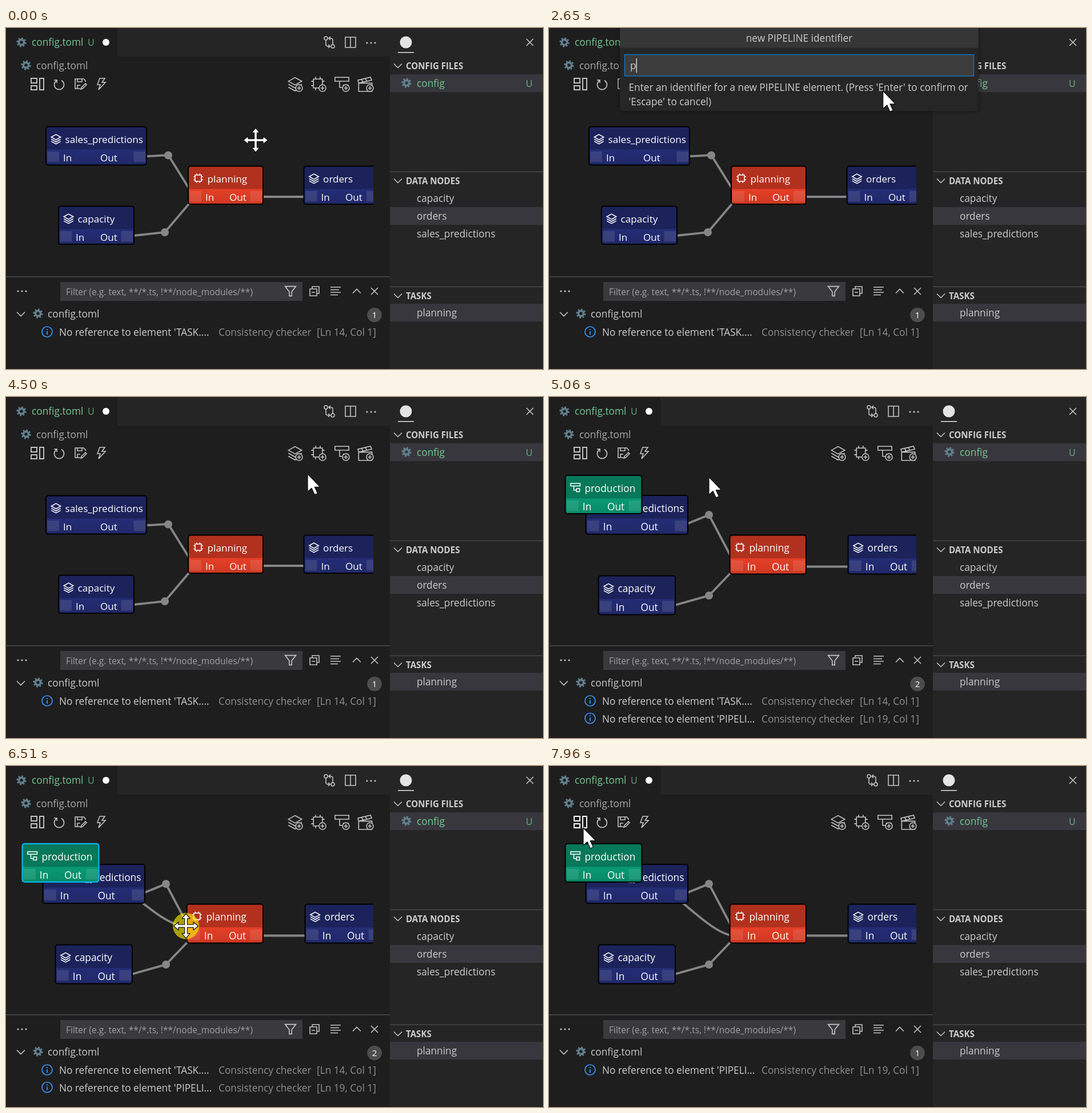
Recreate the animation shown at these times as an HTML page. Size 940x596 px, loop 8 s.

```html
<!DOCTYPE html>
<html lang="en">
<head>
<meta charset="utf-8">
<title>Config editor</title>
<style>
html, body { margin: 0; width: 100%; height: 100%; overflow: hidden; background: #1e1e1e; }
svg { display: block; width: 100%; height: 100%; }
text { font: 17.25px "Open Sans", "Noto Sans", sans-serif; white-space: pre; }
</style>
</head>
<body>
<svg id="stage" viewBox="0 0 940 596"></svg>
<script>
const LOOP = 8000, STEP = 70;
const GRAY = '#c5c5c5', GREEN = '#73c991', LINK = '#868686';

// Drawing helpers
const box = (x, y, w, h, fill, more = '') =>
  `<rect x="${x}" y="${y}" width="${w}" height="${h}" fill="${fill}" ${more}/>`;
const text = (s, x, cy, fill = '#ccc', more = '') =>
  `<text x="${x}" y="${cy + 6}" fill="${fill}" ${more}>${s}</text>`;
const disc = (x, y, r, fill, more = '') =>
  `<circle cx="${x}" cy="${y}" r="${r}" fill="${fill}" ${more}/>`;
const icon = (d, x, y, k = 1, color = GRAY, w = 1.6) =>
  `<path d="${d}" transform="translate(${x} ${y}) scale(${k})" fill="none" stroke="${color}" stroke-width="${w / k}"/>`;
const group = (id, body, more = '') => `<g id="${id}" ${more}>${body}</g>`;

const D = {
  layers: 'M-9-3L0-8L9-3L0 2ZM-9 1L0 6L9 1M-9 5L0 10L9 5',
  chip: 'M-6-6H6V6H-6ZM-3-6V-9M3-6V-9M-3 6V9M3 6V9M-6-3H-9M-6 3H-9M6-3H9M6 3H9',
  pipe: 'M-9-8H9V-3H-9ZM-3-3V5H2M2 2H8V8H2Z',
  clap: 'M-9-2H9V9H-9ZM-9-2L-10-6L7-10L8.5-6L-9-2M-5-7L-3-3.5M0-8.3L2-4.6',
  down: 'M-7-3.5L0 3.5L7-3.5',
  up: 'M-7 3.5L0-3.5L7 3.5',
  cross: 'M-6-6L6 6M6-6L-6 6',
  board: 'M-11-10H-1V-2H-11ZM-11 3H-1V10H-11ZM4-10H11V10H4Z',
  reload: 'M-4-7.5A8.5 8.5 0 1 0 4-7.5M-9-8H-4V-3',
  save: 'M0 8H-9V-9H6L9-6V-4M-5-9V-4H3V-9M-5 8V2H0M9-1L2 6L1 9L4 8L11 1Z',
  bolt: 'M2-10H-3L-7 1H-2L-5 10L7-3H1L6-10Z',
  compare: 'M-6-4V4Q-6 7-2 7H1M-2 4L1 7L-2 10M6 4V-4Q6-7 2-7H-1M2-10L-1-7L2-4M-9-7a3 3 0 1 0 6 0a3 3 0 1 0-6 0M3 7a3 3 0 1 0 6 0a3 3 0 1 0-6 0',
  split: 'M-9-9H9V9H-9ZM0-9V9',
  funnel: 'M-9-8H9L2 1V8H-2V1Z',
  collapse: 'M-4-4V-8H8V4H4M-8-4H4V8H-8ZM-5 2H1',
  lines: 'M-9-7H9M-9-2.5H6M-9 2H9M-9 6.5H4',
};

const gear = (x, y) => `<g fill="none" stroke="#62808f" transform="translate(${x} ${y})">
  <circle r="4.6" stroke-width="3.6"/><circle r="7.4" stroke-width="2.4" stroke-dasharray="2.9"/></g>`;
const dots = (x, y) => [-7, 0, 7].map(d => disc(x + d, y, 1.6, GRAY)).join('');
const plus = (x, y, c = GRAY, bg = '#1e1e1e') =>
  disc(x, y, 6, bg, `stroke="${c}" stroke-width="1.5"`) + icon('M-3.5 0H3.5M0-3.5V3.5', x, y, 1, c);
const heading = (s, y) => icon(D.down, 686, y, 1, GRAY, 1.5) +
  text(s, 700, y - .5, '#ccc', 'style="font-size:15.1px;font-weight:700"');

function node(o) {
  const { x, y, w, h, k = 1, out } = o, top = y + 40 * k, r = 4;
  const port = (px, id) => box(px, top + 3.5 * k, 20.5 * k, 18.5 * k, '#fff', `opacity=".1" id="${o.id}${id}"`);
  return `<g id="${o.id}">` + box(x, y, w, h, o.color, `rx="${r}"`) +
    `<path d="M${x} ${top}V${y + r}q0-${r} ${r}-${r}H${x + w - r}q${r} 0 ${r} ${r}V${top}Z" opacity=".3"/>` +
    `<path d="M${x} ${top}H${x + w}V${y + h - r}q0 ${r}-${r} ${r}H${x + r}q-${r} 0-${r}-${r}Z" fill="url(#row)"/>` +
    port(x + 2.5, 'In') + port(x + w - 22.5 * k, 'Out') +
    box(x, y, w, h, 'none', `id="${o.id}Edge" rx="${r}" stroke="#000" stroke-width="2"`) +
    icon(D[o.icon], x + 17.5 * k, y + 21 * k, .92, '#fff', 1.5) +
    `<g style="font-size:${17.1 * k}px">` +
    [[o.name, 33.6 * k, 22.5], ['In', 30 * k, 54.5], ['Out', out, 54.5]]
      .map(([s, dx, dy]) => text(s, x + dx, y + dy * k, '#fff', 'style="font-size:inherit"')).join('') +
    '</g></g>';
}
const DATA = { color: '#283282', icon: 'layers' };
const TASK = { color: '#ff462b', icon: 'chip', name: 'planning' };
const line = pts => `<polyline points="${pts}" fill="none" stroke="${LINK}" stroke-width="3.8"/>`;
const bend = (x, y) => disc(x, y, 7, LINK);

const before = group('before',
  line('235,225 284,222 330,296') + line('213,364 278,357 330,296') + line('438,295 532,295') +
  bend(284, 222.5) + bend(278, 357) +
  node({ ...DATA, id: 'a', name: 'sales_predictions', x: 70, y: 172.5, w: 176, h: 67, out: 95 }) +
  node({ ...DATA, id: 'b', name: 'capacity', x: 92, y: 311.5, w: 132, h: 66.5, out: 73 }) +
  node({ ...TASK, id: 'c', x: 319, y: 241.5, w: 131, h: 66.5, out: 72 }) +
  node({ ...DATA, id: 'd', name: 'orders', x: 521.5, y: 241.5, w: 132, h: 66.5, out: 72.5 }), 'clip-path="url(#canvas)"');

const k = 1.012;
const after = group('after',
  line('231,226 280,206 328,297') + line('209,367 280,347 328,297') + line('438,296.5 535,296.5') +
  bend(280, 206) + bend(280, 347) +
  `<path id="wire" fill="none" stroke="${LINK}" stroke-width="3.8"/>` +
  node({ ...DATA, k, id: 'e', name: 'sales_predictions', x: 64.5, y: 172, w: 178.5, h: 68, out: 96 }) +
  node({ ...DATA, k, id: 'f', name: 'capacity', x: 86.5, y: 312.5, w: 134.5, h: 68, out: 74 }) +
  node({ ...TASK, k, id: 'plan', x: 316.5, y: 241.5, w: 133.5, h: 68, out: 73.5 }) +
  node({ ...DATA, k, id: 'h', name: 'orders', x: 523.5, y: 241.5, w: 134, h: 68, out: 73.5 }) +
  node({ k, id: 'prod', color: '#0aab7f', icon: 'pipe', name: 'production', x: 28.5, y: 137, w: 134, h: 67, out: 73.5 }),
  'clip-path="url(#canvas)"');

const problem = (id, y, what, ln) => group(id,
  disc(72, y - 1, 9, 'none', 'stroke="#3794ff" stroke-width="1.7"') +
  icon('M0-1V5M0-5V-3', 72, y - 1, 1, '#3794ff', 1.8) +
  text(`No reference to element '${what}`, 93, y) +
  text('Consistency checker', 372, y, '#8f8f8f') + text(`[Ln ${ln}, Col 1]`, 544, y, '#8f8f8f'));

const editor = box(0, 0, 940, 596, '#1e1e1e') + box(195, 0, 477, 50, '#252526') +
  gear(27, 25) + text('config.toml', 45, 25, GREEN) +
  text('U', 143, 25, GREEN, 'style="font-size:16px" opacity=".8"') + disc(175, 25, 6, '#fff') +
  icon(D.compare, 566, 25) + icon(D.split, 603, 25) + dots(639, 26) +
  gear(35, 65) + text('config.toml', 53, 66, '#a9a9a9') +
  group('board', icon(D.board, 55, 98, 1, 'currentColor', 1.9)) +
  icon(D.reload, 93, 99) + icon(D.save, 130, 98) + icon(D.bolt, 167, 98) +
  icon(D.layers, 506, 97, 1.3) + plus(513, 105) +
  icon(D.chip, 546, 97, 1.3) + plus(554, 105) +
  icon(D.pipe, 588, 97, 1.35) + plus(595, 105) +
  icon(D.clap, 629, 99, 1.3) + plus(637, 105);

const panel = box(0, 434, 672, 1.5, '#4b4b4b') + dots(28, 460) +
  box(95, 444, 424, 33, '#3a3a3d') +
  text('Filter (e.g. text, **/*.ts, !**/node_modules/**)', 105, 461, '#a0a0a0', 'style="font-size:15.5px"') +
  icon(D.funnel, 498, 460, 1.05) + icon(D.collapse, 540, 460) + icon(D.lines, 577, 460) +
  icon(D.up, 614, 460) + icon(D.cross, 645, 460) +
  icon(D.down, 26, 500) + gear(56, 499) + text('config.toml', 73, 500) +
  disc(645, 501.5, 12.8, '#4d4d4d') +
  text('1', 645, 501, '#fff', 'id="count" text-anchor="middle" style="font-size:15px"') +
  problem('p1', 532, 'TASK....', 14) + problem('p2', 562.5, 'PIPELI...', 19);

const sidebar = box(672, 0, 268, 596, '#252526') +
  [81, 313, 482].map(y => box(672, y, 268, 31, '#37373d')).join('') +
  [250.5, 451.5].map(y => box(672, y, 268, 1.5, '#474748')).join('') +
  disc(700, 25, 10.5, '#e4e4e4') + box(686, 42, 28, 1.5, '#e4e4e4') + icon(D.cross, 917, 25) +
  heading('CONFIG FILES', 66) + heading('DATA NODES', 267) + heading('TASKS', 468) +
  gear(701, 96) + text('config', 719, 97, GREEN) + text('U', 910, 97, GREEN, 'style="font-size:16px" opacity=".85"') +
  text('capacity', 719, 298) + text('orders', 719, 329) +
  text('sales_predictions', 719, 360) + text('planning', 719, 498);

const dialog = group('dialog',
  box(124, -10, 627.5, 155, '#252526', 'rx="5" filter="url(#shade)"') + box(124, 0, 627.5, 34.5, '#363637') +
  text('new PIPELINE identifier', 438, 18, '#ccc', 'text-anchor="middle"') +
  box(132.5, 46.5, 611, 37.5, '#3c3c3c', 'stroke="#0a7fd0" stroke-width="1.3"') +
  text('', 142, 66, '#ccc', 'id="entry"') + box(142, 53, 1.4, 25, '#ddd', 'id="caret"') +
  text("Enter an identifier for a new PIPELINE element. (Press 'Enter' to confirm or", 139.5, 104) +
  text("'Escape' to cancel)", 139.5, 129));

const keyHint = group('keyHint',
  box(279.5, 149.5, 389, 103, '#a9a9a9', 'stroke="#444" stroke-width="1.8"') +
  box(279.5, 149.5, 389, 103, 'none', 'stroke="#fff" stroke-width="1.8" stroke-dasharray="17 7"') +
  `<text x="475" y="216" text-anchor="middle" fill="#fff" stroke="#fff" stroke-width=".7"
    style="font:41.7px 'Liberation Sans',Arial,sans-serif">&lt;ENTER&gt;</text>`);

const press = group('press',
  group('halo', disc(0, 0, 23, '#fff000', 'opacity=".62"')) +
  group('active', box(574, 81, 27, 37, '#12b95c', 'rx="6" opacity=".8"') +
    icon(D.pipe, 588, 97, 1.35, '#d8f060', 1.9) + plus(595, 105, '#e6f04a', '#58b432')));

const arm = 'L7-13H2.4V-2.4';
const pointer = group('pointer',
  '<path id="arrow" d="M0 0V31L7 24.5L12.3 36L17.5 33.8L12.3 22.7H21.8Z"/>' +
  '<path id="cross" d="M0-21.5L7-13H2.4V-2.4H13V-7L21.5 0L13 7V2.4H2.4V13H7L0 21.5L-7 13H-2.4V2.4H-13V7L-21.5 0L-13-7V-2.4H-2.4V-13H-7Z"/>',
  'fill="#fff" stroke="#111" stroke-width="1.2" stroke-linejoin="round"');

document.getElementById('stage').innerHTML = `<defs>
  <linearGradient id="row" x2="0" y2="1"><stop stop-opacity=".1"/><stop offset="1" stop-opacity=".2"/></linearGradient>
  <clipPath id="canvas"><rect y="134" width="643" height="300"/></clipPath>
  <filter id="shade" x="-5%" y="-10%" width="110%" height="125%"><feDropShadow dx="0" dy="0" stdDeviation="5" flood-opacity=".45"/></filter>
  </defs>` + editor + before + after + panel + sidebar + press + dialog + pointer + keyHint;

const el = id => document.getElementById(id);
const show = (id, on) => el(id).setAttribute('display', on ? 'inline' : 'none');

// Pointer path: time, x, y
const PATH = [
  [0, 437, 196], [280, 446, 229], [490, 502, 188], [700, 566, 110], [770, 576, 103], [840, 579, 107],
  [900, 600, 108], [1040, 661, 108], [1449, 661, 108], [1450, 587, 108], [2580, 587, 108],
  [3420, 559, 134], [4430, 559, 134], [5060, 280, 140], [5270, 147, 183], [5410, 148, 185],
  [5740, 148, 185], [5950, 195, 213], [6580, 330, 288], [6930, 335, 293], [7330, 335, 293],
  [7400, 322, 284], [7890, 66, 113], [7960, 60, 108], [LOOP, 60, 108],
];
function pointAt(t) {
  const i = Math.max(1, PATH.findIndex(p => p[0] > t));
  const [t0, x0, y0] = PATH[i - 1], [t1, x1, y1] = PATH[i], u = (t - t0) / (t1 - t0);
  return [x0 + (x1 - x0) * u, y0 + (y1 - y0) * u];
}

const STARTS = [7330, 5810, 4500, 2650, 1450, 900, 0];
function snap(t) {
  const s = STARTS.find(a => a <= t);
  return s + Math.floor((t - s) / STEP) * STEP;
}

function draw(now) {
  const t = snap(now), within = (a, b) => now >= a && now < b;
  const [x, y] = pointAt(t), moving = y > 142;
  const added = now >= 4640, dragging = within(5810, 7330);

  el('pointer').setAttribute('transform', `translate(${x} ${y})`);
  show('cross', moving);
  show('arrow', !moving);
  show('halo', within(1450, 2250) || within(5270, 7330));
  el('halo').setAttribute('transform', `translate(${x} ${moving ? y : y - 2})`);
  show('active', within(1450, 2250));
  el('board').setAttribute('color', now >= 7890 ? '#fff' : GRAY);

  show('before', !added);
  show('after', added);
  const held = within(5270, 7330);
  el('prod').setAttribute('transform', `translate(0 ${now >= 5270 ? -1.2 : 0})`);
  el('prodEdge').setAttribute('stroke', held ? '#00bfff' : '#000');
  const lit = (id, on) => {
    el(id).setAttribute('fill', on ? '#c0ff00' : '#fff');
    el(id).setAttribute('opacity', on ? 1 : .1);
  };
  lit('prodOut', within(5270, 5880));
  lit('planIn', within(6580, 7400));

  show('wire', now >= 5810);
  const [ex, ey] = dragging ? [x, y] : [327, 297];
  el('wire').setAttribute('d', `M151 190C201 190 ${ex - 50} ${ey} ${ex} ${ey}`);

  const two = within(4850, 7540), solved = now >= 7540;
  show('p1', !solved);
  show('p2', two || solved);
  el('p2').setAttribute('transform', `translate(0 ${solved ? -30.5 : 0})`);
  el('count').textContent = two ? 2 : 1;

  show('dialog', within(2250, 4500));
  const n = now < 2650 ? 0 : Math.min(10, 1 + Math.floor((t - 2650) / STEP));
  const word = 'production'.slice(0, n);
  if (el('entry').textContent !== word) el('entry').textContent = word;
  show('caret', now < 3500);
  el('caret').setAttribute('x', 142 + (n ? el('entry').getComputedTextLength() : 0));
  show('keyHint', within(3700, 4500));
}

const start = performance.now();
function tick() {
  draw((performance.now() - start) % LOOP);
  requestAnimationFrame(tick);
}
tick();
</script>
</body>
</html>
```
